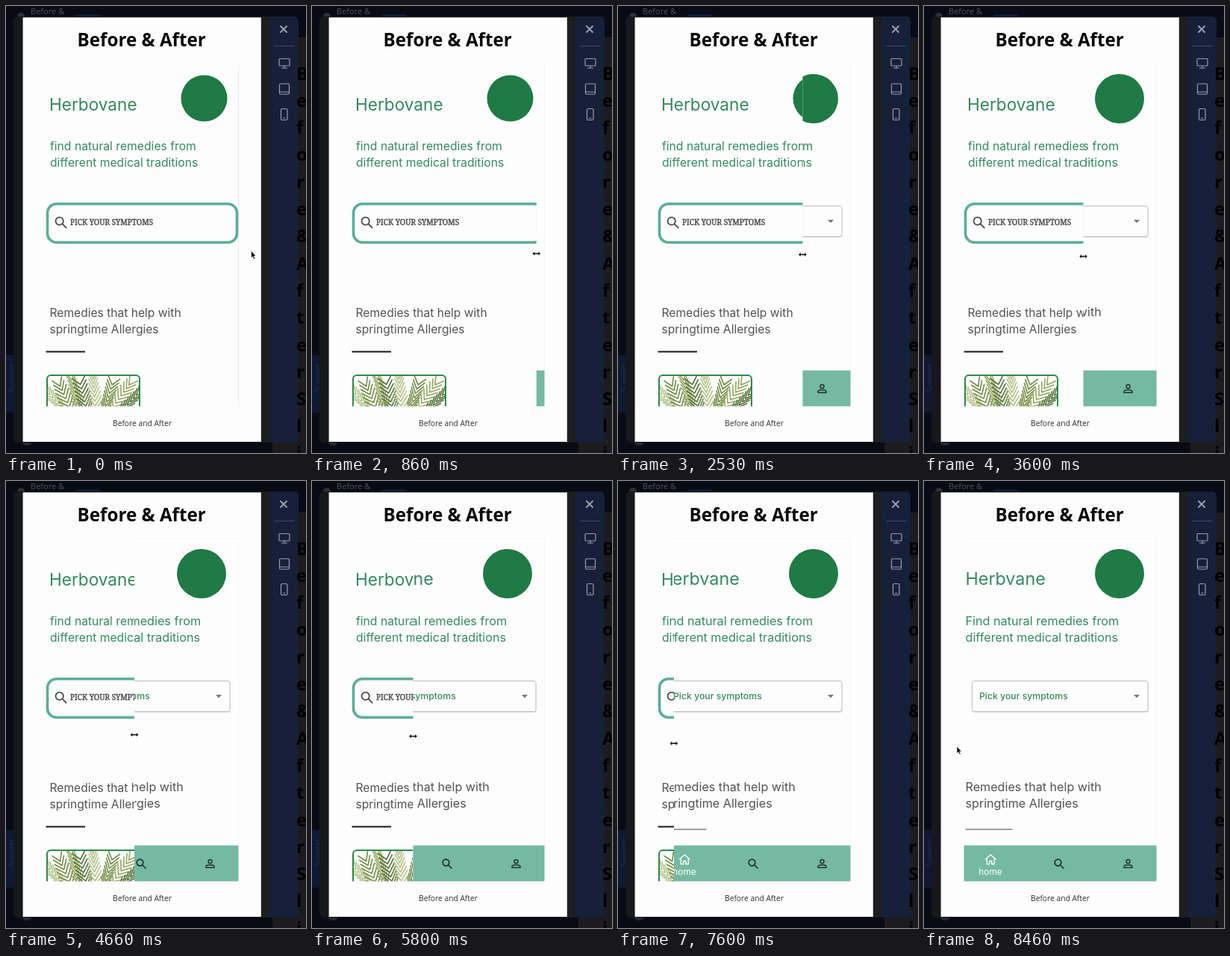
These frames come from a looping animation (402 by 598 pixels, 8660 ms). An HTML page:

```html
<!DOCTYPE html>
<html lang="en">
<head>
<meta charset="utf-8">
<title>Before &amp; After</title>
<style>
  html, body { margin: 0; height: 100%; overflow: hidden; background: #090b14; }
  svg { display: block; width: 100vw; height: 100vh; }
  text { white-space: pre; }
  .open { font-family: "Open Sans", sans-serif; }
  .page { font-family: Inter, sans-serif; }
  .green { fill: #35895f; }
  .grey { fill: #535355; }
  .line { fill: none; stroke-linecap: round; stroke-linejoin: round; }
</style>
</head>
<body>
<svg viewBox="0 0 402 598">
  <defs>
    <clipPath id="afterClip"><rect id="reveal" y="77" width="260" height="459"/></clipPath>
    <clipPath id="pageClip"><rect x="53" y="77" width="259" height="458.500"/></clipPath>
    <clipPath id="photoClip"><rect x="56" y="495" width="122" height="41"/></clipPath>
    <g id="lens" class="line"><circle cx="-1.500" cy="-1.500" r="4.300"/><path d="M2 2L6 6"/></g>
  </defs>

  <!-- dimmed site behind the dialog -->
  <rect width="402" height="598" fill="#090b14"/>
  <rect x="390" y="42" width="12" height="556" fill="#1c1c1f"/>
  <rect x="357" y="583" width="45" height="15" fill="#1c1c1f"/>
  <text class="open" x="33" y="11" font-size="11" fill="#515257">Before &amp;</text>
  <rect x="91" y="11" width="38" height="12" rx="6" fill="#111a38"/>
  <circle cx="20" cy="14" r="5" fill="#302f35"/>
  <circle cx="28" cy="580" r="8" fill="#272a2e"/>
  <rect y="467" width="12" height="77" fill="#0e1933"/>
  <text class="open" transform="translate(12 516) rotate(-90)" font-size="10" fill="#26324f">Support</text>

  <!-- dialog -->
  <rect x="10" y="14" width="381" height="570" rx="6" fill="#16181b"/>
  <rect x="341" y="15" width="12" height="568" fill="#1d1e20"/>
  <path d="M353 14h33a6 6 0 0 1 6 6v558a6 6 0 0 1-6 6h-33z" fill="#162039"/>
  <g id="sideTitle" class="open" font-size="24" font-weight="700" fill="#020203"></g>
  <g class="line" stroke="#979fae" stroke-width="1.200">
    <path d="M368 27l8 8m0-8l-8 8" stroke-width="2"/>
    <path d="M360 53.500h26" stroke="#414b64" stroke-width="1"/>
    <rect x="366" y="70.500" width="14" height="9.500" rx="1"/><path d="M373 80v3m-3.500 0h7"/>
    <rect x="366.500" y="104" width="13" height="14" rx="1.500"/><path d="M367 115h12"/>
    <rect x="368.500" y="137.500" width="8.500" height="15" rx="1.500"/><path d="M371.500 150h2.500"/>
  </g>
  <rect x="22.600" y="15.300" width="319.200" height="567.700" fill="#fdfdfd"/>
  <text class="open" x="95.500" y="54" font-size="24.200" font-weight="700" fill="#080808">Before &amp; After</text>
  <text class="open" x="143" y="562" font-size="10.250" fill="#333">Before and After</text>

  <!-- before -->
  <g class="page" clip-path="url(#pageClip)">
    <path d="M311.500 80v456" stroke="#ededed"/>
    <text class="green" x="58" y="140" font-size="22.600">Herbovane</text>
    <circle cx="265.500" cy="123.500" r="31" fill="#1f7a45"/>
    <g class="green" font-size="15.700">
      <text x="59" y="193">find natural remedies from</text>
      <text x="59" y="215">different medical traditions</text>
    </g>
    <rect x="55.500" y="264.800" width="254" height="51.500" rx="12" fill="none" stroke="#5bae98" stroke-width="3.600"/>
    <use href="#lens" transform="translate(73.500 289.500) scale(1.200)" stroke="#4a4a4a" stroke-width="1.500"/>
    <text x="86" y="293" font-size="10.100" fill="#444" stroke="#444" stroke-width=".35" style="font-family:'Noto Serif',serif">PICK YOUR SYMPTOMS</text>
    <g class="grey" font-size="15.600">
      <text x="58.500" y="416">Remedies that help with</text>
      <text x="58.500" y="438">springtime Allergies</text>
    </g>
    <path d="M53.500 462.500h52.500" stroke="#181818" stroke-width="2.200"/>
    <g id="herbs" class="line" clip-path="url(#photoClip)"></g>
    <rect x="55" y="494" width="124" height="60" rx="5" fill="none" stroke="#2c8a4b" stroke-width="2"/>
  </g>

  <!-- after -->
  <g class="page" clip-path="url(#afterClip)">
    <rect x="53" y="77" width="259" height="459" fill="#fdfdfd"/>
    <path d="M53 77.500h258.500v458" fill="none" stroke="#f5f5f5"/>
    <text class="green" x="55.500" y="138.500" font-size="23.300">Herbvane</text>
    <circle cx="262" cy="124" r="33" fill="#1f7a45"/>
    <g class="green" font-size="16.200">
      <text x="55.500" y="193">Find natural remedies from</text>
      <text x="55.500" y="214.500">different medical traditions</text>
    </g>
    <rect x="64.500" y="268.500" width="236" height="41.500" rx="3" fill="#e3e3e3"/>
    <rect x="64.500" y="267.500" width="235.500" height="41" rx="3" fill="#fdfdfd" stroke="#bdbdbd"/>
    <text class="green" x="74" y="292" font-size="12.250" font-weight="500">Pick your symptoms</text>
    <path d="M281 286h8l-4 4.200z" fill="#757575"/>
    <g class="grey" font-size="16.150">
      <text x="55.500" y="415">Remedies that help with</text>
      <text x="55.500" y="437">springtime Allergies</text>
    </g>
    <path d="M55.500 466h63" stroke="#444" stroke-width="1.100"/>
    <rect x="53.500" y="487.500" width="258" height="48" rx="1" fill="#75b9a3"/>
    <path class="line" d="M82.500 506l6.800-6 6.800 6m-11.800-1.500v8h3.500v-4h3v4h3.500v-8" stroke="#fff" stroke-width="1.300"/>
    <text x="89" y="527" font-size="11.800" fill="#fff" text-anchor="middle">home</text>
    <use href="#lens" x="181" y="512" stroke="#22332e" stroke-width="1.700"/>
    <g class="line" stroke="#22332e" stroke-width="1.500">
      <circle cx="273.500" cy="509" r="2.500"/>
      <path d="M268 517.300v-1.300c0-3.200 11-3.200 11 0v1.300z"/>
    </g>
  </g>

  <g id="cursor">
    <path id="arrow" d="M0-4.500v9.500l2.100-1.900 1.500 3.400 1.600-.8-1.500-3.200h2.700z" fill="#050505" stroke="#fff" stroke-width=".6"/>
    <path id="resize" d="M-5.500 0l3-3v2h5v-2l3 3-3 3v-2h-5v2z" fill="#050505" stroke="#fff" stroke-width=".5"/>
  </g>
</svg>
<script>
const LOOP = 8660, STEP = 1000 / 15, LEFT = 53, RIGHT = 312;
const $ = id => document.getElementById(id);

[..."Before&AfterSli"].forEach((letter, i) => {
  $("sideTitle").innerHTML += `<text x="389" y="${98.5 + i * 36.3}">${letter.replace("&", "&amp;")}</text>`;
});

// Rosemary: stems fanning up from below, with slim paired needles.
function sprig(x, y, angle, color) {
  let d = "";
  for (let s = 0; s < 48; s += 6) {
    const px = x + Math.cos(angle) * s, py = y - Math.sin(angle) * s;
    for (const side of [-0.55, 0.55]) {
      const length = 17 - s * 0.1, a = angle + side * (1 + 0.3 * Math.sin(s + x));
      d += `M${px} ${py}l${Math.cos(a) * length} ${-Math.sin(a) * length}`;
    }
  }
  return `<path d="${d}" stroke="${color}" stroke-width="1.600"/>`;
}
const leafColors = ["#b5c288", "#6f8a42", "#93a860", "#55733a"];
for (let i = 0; i < 8; i++) {
  const angle = 2.35 - i * 0.21 + 0.15 * Math.sin(i * 5);
  $("herbs").innerHTML += sprig(80 + i * 10, 541 + (i % 2) * 6, angle, leafColors[i % 4]);
}

// Pointer path: [ms, x, y]
const path = [
  [0, 328.5, 332], [1660, 275, 330.5], [3600, 213.5, 335], [4660, 172, 339.5],
  [5800, 135.5, 341.5], [6930, 99, 344.5], [8460, 44, 359.5]
];
// Ticks on which the pointer rests
const rests = [18, 19, 47, 50, 71, 75, 76, 83, 86, 100, 128, 129];

function pointerAt(t) {
  let i = 1;
  while (i < path.length - 1 && t > path[i][0]) i++;
  const [a, b] = [path[i - 1], path[i]];
  const k = Math.min(1, (t - a[0]) / (b[0] - a[0]));
  return [a[1] + (b[1] - a[1]) * k, a[2] + (b[2] - a[2]) * k];
}

function draw(now) {
  const t = Math.floor((now % LOOP) / 10) * 10;
  let tick = Math.floor((t + 6.7) / STEP);
  while (rests.includes(tick)) tick--;
  const [x, y] = pointerAt(Math.floor(tick * STEP / 10) * 10);
  const inside = x >= LEFT && x <= RIGHT;
  $("reveal").setAttribute("x", Math.max(LEFT, Math.min(RIGHT, x)));
  $("cursor").setAttribute("transform", `translate(${x} ${y})`);
  $("arrow").style.display = inside ? "none" : "";
  $("resize").style.display = inside ? "" : "none";
}

const start = performance.now();
function loop() {
  draw(performance.now() - start);
  requestAnimationFrame(loop);
}
loop();
</script>
</body>
</html>
```
